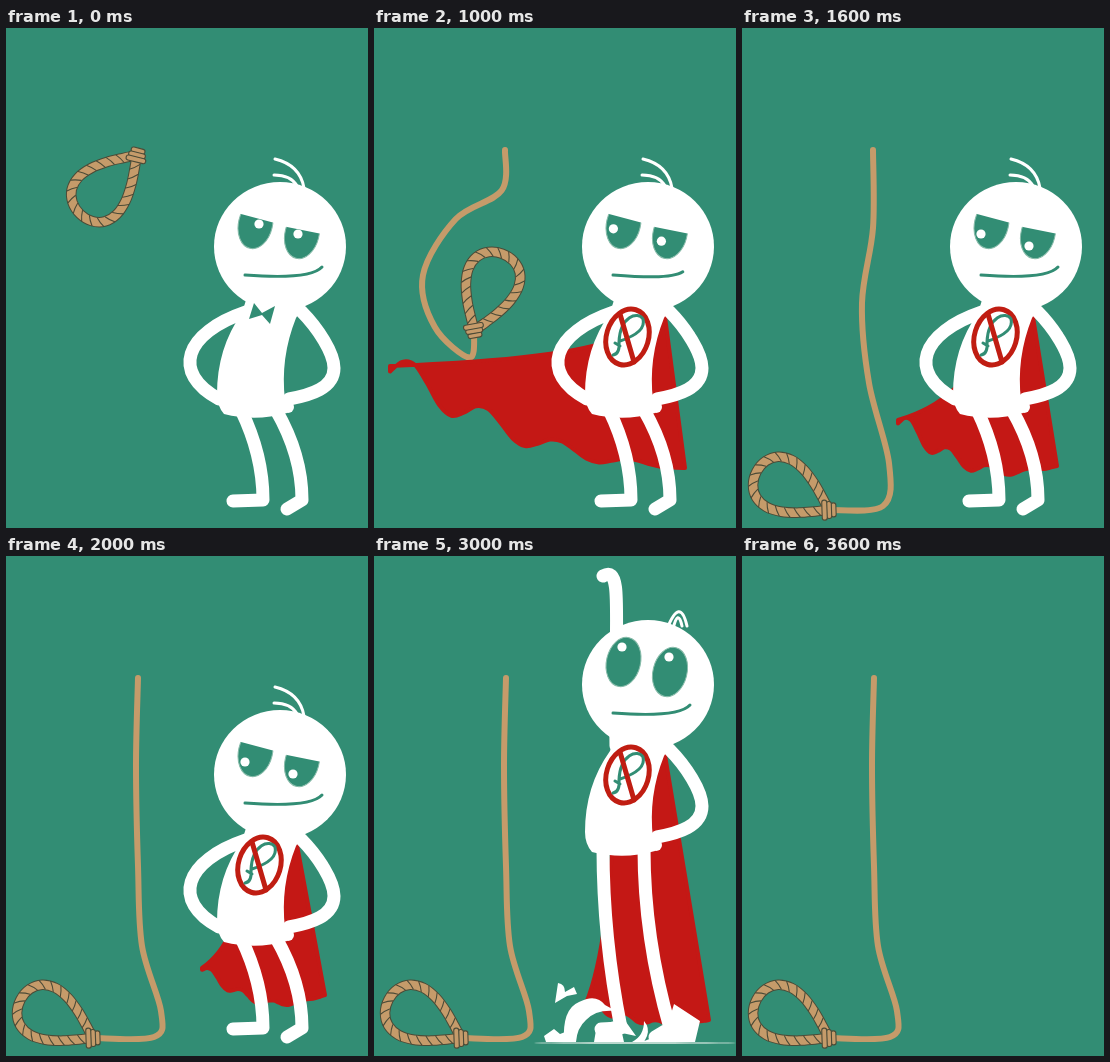
These frames come from a looping animation (362x500 px, 4.1 s). An HTML page:

```html
<!DOCTYPE html>
<html lang="en">
<head>
<meta charset="utf-8">
<title>Rope and hero</title>
<style>
  html, body { margin: 0; width: 100%; height: 100%; overflow: hidden; background: #328d74; }
  svg { display: block; width: 362px; height: 500px; }
  .line { fill: none; stroke-linecap: round; stroke-linejoin: round; }
  .limb { stroke: #fff; stroke-width: 13; }
  .hair { stroke: #fff; stroke-width: 3; }
  .teal { fill: #328d74; }
  .ink { stroke: #328d74; stroke-width: 3; }
  .eye { fill: #328d74; stroke: #86bba9; stroke-width: 1; }
  .tan { stroke: #c59b6a; }
  .dark { stroke: #4b4b37; }
  .white { fill: #fff; }
  .sign { stroke: #c01d12; stroke-width: 5; }
  #cape { fill: #c41815; stroke: #c41815; stroke-width: 4; stroke-linejoin: round; }
  #dust path { transform-box: fill-box; transform-origin: 50% 100%; }
</style>
</head>
<body>
<svg viewBox="0 0 362 500">
  <defs>
    <clipPath id="clipL"><path id="lidL"/></clipPath>
    <clipPath id="clipR"><path id="lidR"/></clipPath>
  </defs>

  <path id="rope" class="line tan" stroke-width="6"/>
  <g id="hero">
    <path id="cape"/>
    <path id="legL" class="line limb"/>
    <path id="legR" class="line limb"/>
    <g id="torso">
      <path id="arm" class="line limb"/>
      <path class="line limb" d="M295 283C312 300 328 325 328 340C328 360 305 367 283 371"/>
      <circle class="white" cx="282" cy="379" r="6"/>
      <path class="white" d="M240 272H301L290 290Q274 330 279 372L281 385Q250 394 218 386Q211 378 211 366Q211 320 236 285Z"/>
      <path id="hair" class="line hair"/>
      <ellipse class="white" cx="274" cy="218.5" rx="66" ry="64.5"/>
      <g clip-path="url(#clipL)">
        <ellipse class="eye" cx="249.5" cy="196" rx="17" ry="25" transform="rotate(13 249.5 196)"/>
        <circle id="pupilL" class="white" r="4.6"/>
      </g>
      <g clip-path="url(#clipR)">
        <ellipse class="eye" cx="296" cy="206" rx="17" ry="25" transform="rotate(14 296 206)"/>
        <circle id="pupilR" class="white" r="4.6"/>
      </g>
      <path id="mouth" class="line ink"/>
      <path id="bow" class="teal" d="M243 291L248 275L256 285L269 278L264 296L256 287Z"/>
      <g id="badge">
        <ellipse class="sign white" cx="253.5" cy="309" rx="21" ry="28.5" transform="rotate(17 253.5 309)"/>
        <path class="line ink" d="M239 327Q246 326 245 314C246 288 264 283 269 291C272 302 258 309 246 313M241 315L246 318"/>
        <path class="line sign" d="M246 286L260 334"/>
      </g>
    </g>
  </g>
  <g id="dust" class="white">
    <path d="M184 427Q191 428 191 436L200 431L203 438L193 440L181 447Z"/>
    <path d="M190 486Q188 453 205 446Q222 437 231 449L242 455Q222 453 212 464Q203 472 202 486Z"/>
    <path d="M170 480L180 473L186 478L194 475L197 486H172Z"/>
    <path d="M222 474Q236 462 252 466L262 480L248 477L250 486H220Z"/>
    <path d="M258 486Q270 480 270 465Q276 472 273 480L270 486Z"/>
    <path d="M268 486Q285 480 294 468L300 448L326 465L321 486Z"/>
  </g>
  <ellipse id="ground" cx="261" cy="487" rx="101" ry="1" fill="#b9d8cd"/>
  <path id="loopEdge" class="line dark" stroke-width="10.5"/>
  <path id="loop" class="line tan" stroke-width="8.5"/>
  <path id="twist" class="line dark" stroke-width="1.1"/>
  <g id="knot" fill="#c59b6a" class="dark" stroke-width="1.1">
    <rect x="-7" y="-7" width="5" height="14" rx="2.3"/>
    <rect x="-2.5" y="-8.5" width="5" height="17" rx="2.3"/>
    <rect x="2" y="-10" width="5" height="20" rx="2.3"/>
  </g>
</svg>
<script>
const LOOP = 4100, STEP = 100;
const el = {};
document.querySelectorAll('[id]').forEach(n => el[n.id] = n);

const draw = (name, d) => el[name].setAttribute('d', d);
const place = (name, v) => el[name].setAttribute('transform', v);
const show = (name, on) => el[name].style.display = on ? '' : 'none';
const mix = (a, b, k) => a + (b - a) * k;

// Linear interpolation between keys of the form [time, ...values].
function at(keys, t) {
  const i = keys.findIndex(key => t <= key[0]);
  if (i <= 0) return keys.at(i).slice(1);
  const a = keys[i - 1], b = keys[i], k = (t - a[0]) / (b[0] - a[0]);
  return a.map((v, j) => mix(v, b[j], k)).slice(1);
}

// Smooth curve through [x, y] points.
function curve(pts) {
  const pt = i => pts[Math.max(0, Math.min(pts.length - 1, i))];
  let d = 'M' + pts[0];
  for (let i = 0; i < pts.length - 1; i++) {
    const [a, b, c, e] = [pt(i - 1), pt(i), pt(i + 1), pt(i + 2)];
    const c1 = b.map((v, k) => v + (c[k] - a[k]) / 6);
    const c2 = c.map((v, k) => v - (e[k] - b[k]) / 6);
    d += `C${c1} ${c2} ${c}`;
  }
  return d;
}

// Time, noose angle, then rope points; the last one is the knot.
const ropeKeys = [
  [400, 134, ...Array(7).fill([131, 127]).flat()],
  [700, -40, 131,122, 124,144, 92,164, 73,205, 80,245, 95,266, 102,244],
  [1200, -90, 131,122, 130,175, 75,209, 33,275, 48,335, 96,372, 99,342],
  [1600, -152, 131,122, 131,200, 120,275, 127,355, 147,435, 141,478, 87,482],
  [2000, -152, 132,122, 130,210, 132,310, 136,390, 155,455, 148,481, 87,482]
];

function drawRope(t) {
  const [angle, ...flat] = at(ropeKeys, t);
  const pts = [];
  for (let i = 0; i < flat.length; i += 2) pts.push([flat[i], flat[i + 1]]);
  draw('rope', curve(pts));
  drawNoose(...pts.at(-1), angle);
}

// Teardrop loop with slanted strand marks.
function drawNoose(x, y, angle) {
  const r = angle * Math.PI / 180, c = Math.cos(r), s = Math.sin(r);
  const pts = [];
  for (let i = 0; i <= 16; i++) {
    const a = i / 16 * 2 * Math.PI;
    const u = 41 * (1 - Math.cos(a));
    const v = -36 * Math.sin(a) * Math.sin(a / 2) ** 1.2;
    pts.push([x + u * c - v * s, y + u * s + v * c]);
  }
  const d = curve(pts);
  draw('loopEdge', d);
  draw('loop', d);
  place('knot', `translate(${x} ${y}) rotate(${angle - 30})`);

  let marks = '';
  const len = el.loop.getTotalLength();
  for (let p = 12; p < len - 9; p += 10) {
    const a = el.loop.getPointAtLength(p), b = el.loop.getPointAtLength(p + 1);
    const ux = b.x - a.x, uy = b.y - a.y;
    const edge = k => `${a.x + k * (3 * ux - 4.3 * uy)} ${a.y + k * (3 * uy + 4.3 * ux)}`;
    marks += `M${edge(1)}Q${a.x + ux} ${a.y + uy} ${edge(-1)}`;
  }
  draw('twist', marks);
}

// Time, tip x and y, corner x and y, hem sag, hem wave.
const capeKeys = [
  [900, 155, 390, 314, 440, 20, 10],
  [1000, 16, 338, 311, 440, 24, 18],
  [1200, 76, 341, 309, 440, 22, 16],
  [1600, 156, 392, 315, 438, 24, 11],
  [2000, 196, 412, 319, 439, 20, 6],
  [2700, 196, 412, 319, 439, 20, 6],
  [3000, 212, 447, 335, 464, 10, 5]
];

function drawCape(t, dy) {
  const [tx, ty, cx, cy, sag, wave] = at(capeKeys, t);
  const lx = 242, ly = 310 + dy, rx = 291, ry = 289 + dy;
  const hem = [];
  for (let u = 0; u <= 1.001; u += 1 / 24) {
    const drop = sag * Math.sin(Math.PI * u);
    const ripple = wave * (1 - u) * Math.cos(8 * Math.PI * (u - 0.2));
    hem.push([mix(tx, cx, u), mix(ty, cy, u) + drop + ripple]);
  }
  draw('cape', `M${lx} ${ly}Q${mix(lx, tx, 0.2)} ${mix(ly, ty, 0.75)} ${tx} ${ty}` +
    curve(hem).replace('M', 'L') +
    `Q${mix(rx, cx, 0.4)} ${mix(ry, cy, 0.4)} ${rx} ${ry}Z`);
}

// Time, torso shift, eyelid shift, knee bend, left ankle x.
const poseKeys = [[2600, 0, 0, 1, 257], [2700, 4, -12, 0.5, 252], [3000, -90, -40, 0, 247]];
const riseKeys = [[3000, 0], [3100, -100], [3200, -290]];
const armKeys = [
  [2600, 240,284, 178,305, 165,345, 213,371],
  [2700, 240,279, 190,282, 190,300, 219,303],
  [3000, 242,280, 240,150, 250,98, 229,110]
];
const hairKeys = [
  [2600, 269,131, 294,137, 298,160, 268,147, 285,147, 291,158],
  [2700, 278,125, 294,134, 298,160, 276,140, 288,144, 291,158],
  [3000, 313,160, 306,130, 293,163, 308,160, 304,142, 299,163]
];
const mouthKeys = [[400, 316, 239], [700, 298, 251], [1200, 316, 239]];
const pupilKeys = [
  [400, 253,196, 292,206],
  [700, 240,193, 288,206],
  [1200, 239,206, 287,218],
  [2600, 239,206, 287,218],
  [2700, 243,194, 290,205],
  [3000, 248,181, 295,191]
];

const leg = (hipX, hipY, ankle, toeX, toeY, bend) =>
  `M${hipX} ${hipY}Q${mix(hipX, ankle, bend)} ${mix(hipY, 472, 0.5)} ${ankle} 472L${toeX} ${toeY}`;

const lid = (x, y, slope) =>
  `M${x - 30} ${y - 30 * slope}L${x + 30} ${y + 30 * slope}V260H${x - 30}Z`;

function drawHero(t) {
  const [dy, open, bend, ankle] = at(poseKeys, t);
  place('hero', `translate(0 ${at(riseKeys, t)})`);
  place('torso', `translate(0 ${dy})`);
  show('hero', t < 3300);
  show('cape', t >= 900);
  show('badge', t >= 900);
  show('bow', t < 900);

  drawCape(t, dy);
  draw('legL', leg(mix(229, 235, bend), 382 + dy, ankle, 227, 473, bend));
  draw('legR', leg(270, 382 + dy, 296, 281, 481, bend));
  const arm = at(armKeys, t), hair = at(hairKeys, t), pupil = at(pupilKeys, t);
  draw('arm', `M${arm.slice(0, 2)}C${arm.slice(2)}`);
  draw('hair', `M${hair.slice(0, 2)}Q${hair.slice(2, 6)}M${hair.slice(6, 8)}Q${hair.slice(8)}`);
  const [mx, my] = at(mouthKeys, t);
  draw('mouth', `M239 247C265 249 ${mx - 11} 251 ${mx} ${my}`);
  place('pupilL', `translate(${pupil.slice(0, 2)})`);
  place('pupilR', `translate(${pupil.slice(2)})`);
  draw('lidL', lid(250, 190 + open, 0.27));
  draw('lidR', lid(296, 202 + open, 0.2));
}

// Shards spread and shrink after take-off.
function drawDust(t) {
  const on = t >= 2900 && t < 3600;
  show('dust', on);
  show('ground', on);
  const k = Math.max(0, t - 3000) / 600;
  const size = t < 3000 ? 0.5 : 1 - k;
  [...el.dust.children].forEach((n, i) => {
    n.style.transform = `translate(${(i - 2.5) * 14 * k}px, 0) scale(${size})`;
  });
}

const start = performance.now();
function frame() {
  const now = (performance.now() - start) % LOOP;
  const t = Math.floor(now / STEP) * STEP;
  drawRope(t);
  drawHero(t);
  drawDust(t);
  requestAnimationFrame(frame);
}
frame();
</script>
</body>
</html>
```
